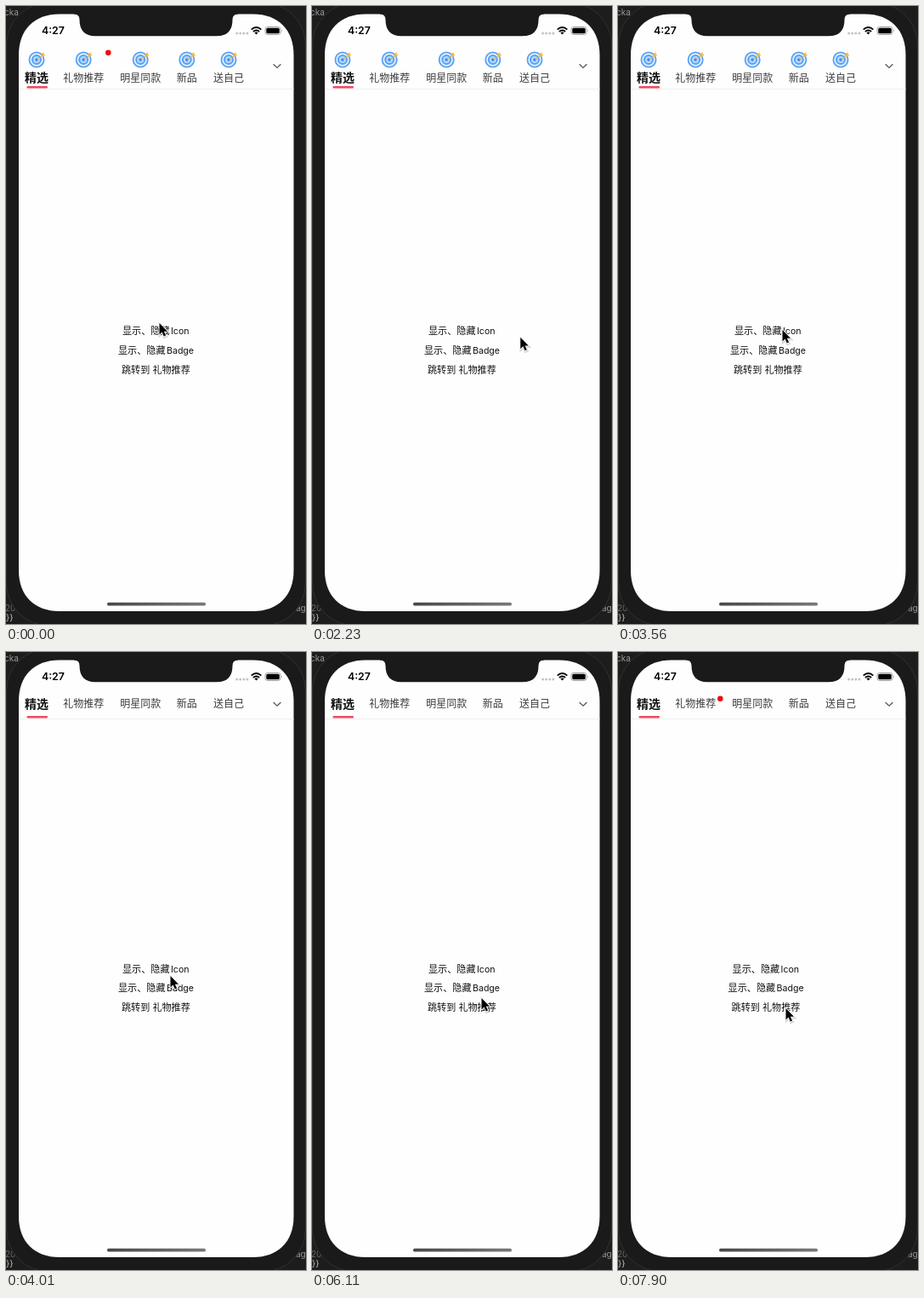
These frames come from a looping animation (353x725 px, 8 s). An HTML page:

```html
<!DOCTYPE html>
<html lang="zh-CN">
<head>
<meta charset="utf-8">
<style>
  html, body { margin: 0; width: 100%; height: 100%; overflow: hidden; background: #1d1d1d; }
  svg { display: block; width: 353px; height: 725px; }
  text { font-family: Inter, "Noto Sans CJK SC", sans-serif; white-space: pre; }
  .code { font-size: 10px; fill: #999; }
  .tab { font-size: 12px; fill: #3c3c3c; }
  .active { font-size: 14px; font-weight: 700; fill: #111; }
  .row { font-size: 11.1px; fill: #111; }
  .row tspan { font-size: 10.6px; }
</style>
</head>
<body>
<svg viewBox="0 0 353 725">
  <defs>
    <linearGradient id="bar">
      <stop offset="0" stop-color="#484848"/>
      <stop offset="1" stop-color="#787878"/>
    </linearGradient>
    <g id="target" fill="none">
      <circle r="8.6" fill="#e4f1ff" stroke="#58a2f2" stroke-width="1.8"/>
      <circle r="5" fill="#b5d8fc" stroke="#58a2f2" stroke-width="2"/>
      <circle r="1.7" fill="#2f80e4"/>
      <path d="M0 0 6-4.2" stroke="#e0a850"/>
      <path d="M5-4 6-7 8.5-9 8.4-6.6 10.3-6 8-3.6Z" fill="#f8b63a"/>
    </g>
    <path id="arrow" d="M0 0V15.2L3.5 12 6 17.6 8.6 16.5 6.1 11H10.8Z"/>
  </defs>

  <g class="code">
    <text x="-2" y="10.5">cka</text>
    <text x="-1" y="710" fill-opacity=".6">20</text>
    <text x="0" y="720.5" style="fill:#c4c4c4">}}</text>
    <text x="341" y="710">ag</text>
  </g>
  <rect x=".5" y="-4" width="352" height="731" rx="50" fill="#1a1a1a" stroke="#303030"/>
  <path fill="#fefefe" d="M15 57.5C15 28 33 9.5 63 9.5H290.5C320.5 9.5 338.5 28 338.5 57.5V662C338.5 691.5 320.5 710 290.5 710H63C33 710 15 691.5 15 662Z"/>
  <path d="M80 9V9.5Q86.5 9.5 86.5 16C86.5 29 93 35.2 105 35.2H248C260 35.2 266.5 29 266.5 16Q266.5 9.5 273 9.5V9Z" fill="#1a1a1a"/>

  <text x="42" y="33.4" font-size="12.3" font-weight="600">4:27</text>
  <g id="signal" fill="#c4c4c4"></g>
  <g fill="none" stroke="#000" stroke-width="1.9">
    <path d="M288.7 27.6Q294.5 22.6 300.3 27.6M290.9 30Q294.5 26.9 298.1 30"/>
    <path d="M292.4 31.3Q294.5 29.7 296.6 31.3L294.5 33.6Z" fill="#000" stroke="none"/>
  </g>
  <rect x="305" y="24.5" width="18" height="9" rx="2.6" fill="none" stroke="#999" stroke-width=".9"/>
  <rect x="306.3" y="25.8" width="15.4" height="6.4" rx="1.5"/>
  <path d="M324.3 27.4Q326 29 324.3 30.6Z" fill="#999"/>

  <g id="icons"></g>
  <g id="tabs"></g>
  <g id="edge">
    <path d="M15 78.5H338.5" stroke="#eee"/>
    <rect x="24.5" y="75" width="24.5" height="2.6" rx="1.3" fill="#f2475c"/>
  </g>
  <path id="chevron" d="M314.6 59 319 63.2 323.4 59" fill="none" stroke="#555" stroke-width="1.2"/>
  <circle id="badge" cx="120.3" cy="54.8" r="3.3" fill="#f20a0a"/>

  <g id="rows" class="row">
    <text x="137" y="375.7">显示、隐藏<tspan x="194">Icon</tspan></text>
    <text x="132" y="398.4">显示、隐藏<tspan x="189">Badge</tspan></text>
    <text x="136" y="421.4">跳转到 礼物推荐</text>
  </g>
  <rect x="119" y="699.8" width="116" height="3.7" rx="1.85" fill="url(#bar)"/>

  <g id="cursor">
    <g transform="translate(.5 1) scale(.88)">
      <use href="#arrow" x=".6" y="1.4" fill="none" stroke="#000" stroke-opacity=".16" stroke-width="3"/>
      <use href="#arrow" stroke="#fff" stroke-width="2" stroke-linejoin="round" paint-order="stroke"/>
    </g>
  </g>
</svg>
<script>
const LOOP = 8000;
const $ = id => document.getElementById(id);
const move = (id, x, y) => $(id).setAttribute('transform', `translate(${x} ${y})`);
const show = (id, on) => $(id).setAttribute('visibility', on ? 'visible' : 'hidden');

// label, left edge
const tabs = [['精选', 22], ['礼物推荐', 67.2], ['明星同款', 134.2], ['新品', 200.8], ['送自己', 244]];
const repeat = (id, items, markup) => $(id).innerHTML = items.map(markup).join('');
repeat('tabs', tabs, ([label, x], i) =>
  `<text class="${i ? 'tab' : 'active'}" x="${x}" y="${i ? 65.4 : 66.2}">${label}</text>`);
repeat('icons', tabs, ([label, x], i) =>
  `<use href="#target" x="${x + label.length * (i ? 6 : 7)}" y="63"/>`);
repeat('signal', [0, 1, 2, 3], i => `<circle cx="${271.6 + i * 4.1}" cy="32" r="1.5"/>`);

// Each sweep is a quadratic curve, bending towards `via` and held between steps
const home = [180, 371];
const sweeps = [
  { start: 1050, end: 1480, steps: 4, via: [222, 400], to: [200, 401] },
  { start: 2080, end: 2530, steps: 4, via: [260, 384], to: [259, 382] },
  { start: 2980, end: 3560, steps: 5, via: [210, 378], to: [193, 379] },
  { start: 4310, end: 5060, steps: 6, via: [290, 311], to: [199, 416] },
  { start: 6110, end: 6260, steps: 2, via: [199, 405], to: [199, 394] },
  { start: 6860, end: 7600, steps: 6, via: [272, 391], to: [197, 417] }
];

function pointerAt(t) {
  let from = home;
  for (const { start, end, steps, via, to } of sweeps) {
    if (t < start) break;
    const step = Math.floor((t - start) / (end - start) * (steps - 1)) + 1;
    const p = Math.min(1, step / steps), q = 1 - p;
    from = from.map((a, i) => q * q * a + 2 * p * q * via[i] + p * p * to[i]);
  }
  return from;
}

function draw(t) {
  const withIcons = t < 4010;
  move('cursor', ...pointerAt(t));
  show('icons', withIcons);
  show('badge', t < 1780 || t >= 6560);
  move('tabs', 0, withIcons ? 23.2 : 0);
  move('edge', 0, withIcons ? 19 : 0);
  move('chevron', 0, withIcons ? 9.3 : 0);
  move('rows', t >= 7900 ? -2.4 : 0, withIcons ? 9.3 : 0);
}

const start = performance.now();
(function tick() {
  draw((performance.now() - start) % LOOP);
  requestAnimationFrame(tick);
})();
</script>
</body>
</html>
```
